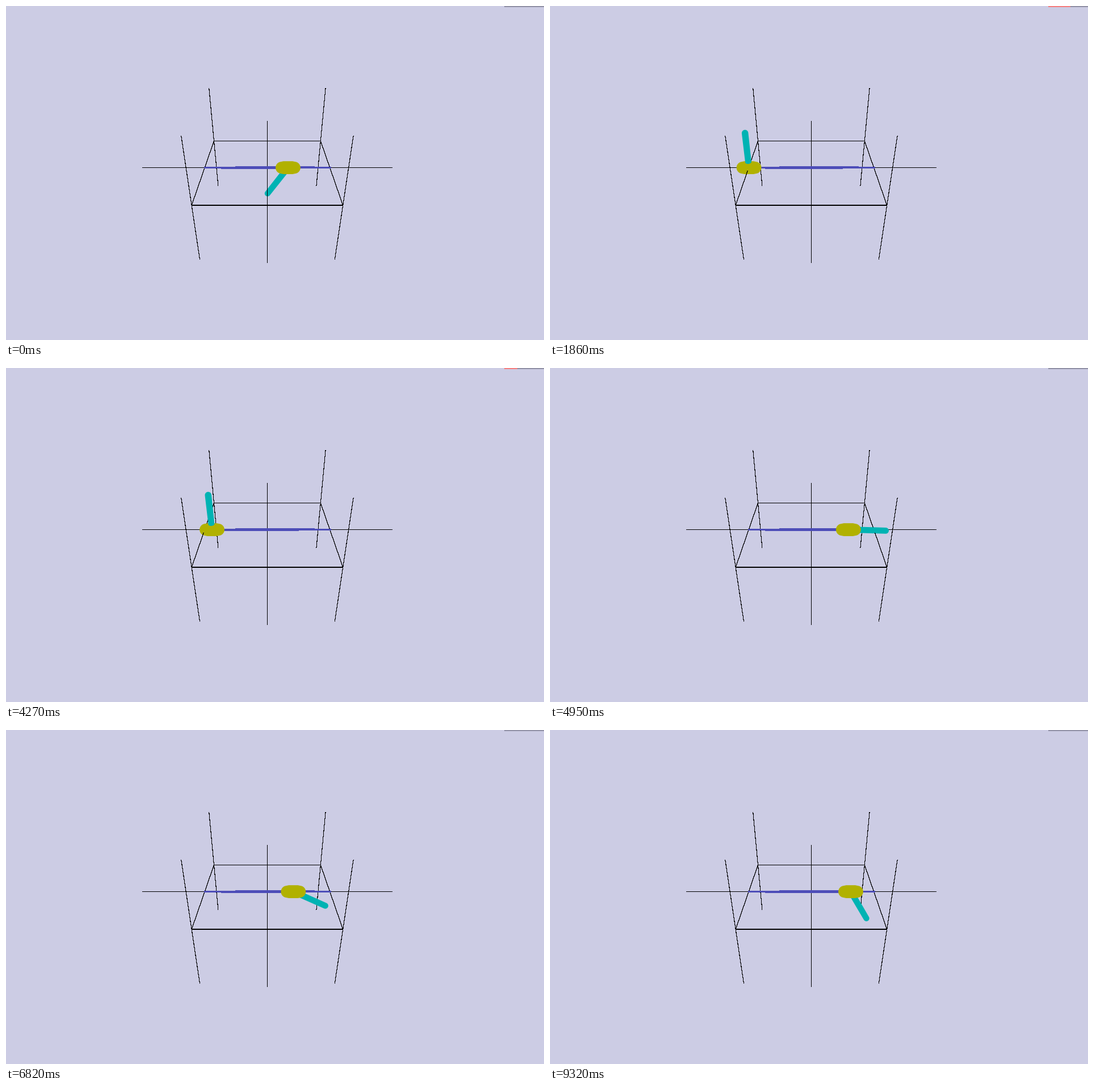
These frames come from a looping animation (948x590 px, 9370 ms). A matplotlib script:

```python
import numpy as np
import matplotlib.pyplot as plt
from matplotlib.animation import FuncAnimation
from matplotlib.patches import Polygon, Rectangle

W, H, DPI = 948, 590, 100
LOOP = 9370                      # ms
POSES = 206
FRAMES = 2 * POSES               # every pose is held for two frames
STEP = 9.32 / (POSES - 1)        # seconds between poses

CX, CY = 460.4, 285.4            # screen position of the world centre
FOCAL, DIST = 551, 5.0
SIN, COS = 0.5, np.sqrt(3) / 2   # camera pitch of 30 degrees

BACK = (0.8, 0.8, 0.894)
YELLOW = (0.694, 0.694, 0)
CYAN = (0, 0.7, 0.7)
BLUE = (0.3, 0.3, 0.72)
GREY = (0.57, 0.57, 0.65)
PINK = (0.96, 0.5, 0.5)

POLE, POLE_R = 0.6, 0.049

# Each swing: time the pole hangs straight down (s), right-most cart
# position, left resting position (px), slowness of the slide between them
SWINGS = [
    (0.050, 524, 350.5, 0.567),
    (2.420, 513, 363, 0.369),
    (4.765, 526, 359, 0.380),
    (6.690, 515, 391, 0.744),
    (9.262, 563, 391, 0.500),
]
CART_START = 465
FALL = 0.52                      # from upright to hanging
OVERRUN = 0.2                    # cart keeps going right after that
RISE_RATE = 4.5

# Strip in the corner: pulses run through it from right to left
STRIP_L, STRIP_SPEED = 878, 82
PULSE_FIRST, PULSE_EVERY, PULSE_LEN, PULSE_COUNT = 1.0, 2.225, 0.48, 4


def scale(y, z):
    return FOCAL / (DIST + y * COS - z * SIN)


def project(x, y, z):
    k = scale(y, z)
    return np.array([CX + x * k, CY - (y * SIN + z * COS) * k])


fig = plt.figure(figsize=(W / DPI, H / DPI), dpi=DPI, facecolor=BACK)
ax = fig.add_axes([0, 0, 1, 1])
ax.set_xlim(0, W)
ax.set_ylim(H, 0)
ax.axis("off")


def shape(points, color, z, **style):
    p = Polygon(points, closed=True, facecolor=color, edgecolor="none",
                zorder=z, **style)
    ax.add_patch(p)
    return p


def line(p, q, z):
    """Hard one-pixel line, drawn as a very thin ribbon."""
    a, b = project(*p), project(*q)
    d = (b - a) / np.hypot(*(b - a))
    n = 0.05 * np.array([-d[1], d[0]])
    shape([a + n, b + n, b - n, a - n], "black", z,
          antialiased=False, snap=False)


def box(x, y, w, h, color, z):
    r = Rectangle((x, y), w, h, facecolor=color, edgecolor="none", zorder=z)
    ax.add_patch(r)
    return r


# Wire frame; parts nearer than the cart go on top
BEHIND, FRONT, SPLIT = 1, 6, -0.1
line((-2, 0, 0), (2, 0, 0), BEHIND)
for x, reach in ((-1, 1), (0, 2), (1, 1)):
    line((x, reach, 0), (x, SPLIT, 0), BEHIND)
    line((x, SPLIT, 0), (x, -reach, 0), FRONT)
for y, z in ((1, BEHIND), (-1, FRONT)):
    line((-1, y, 0), (1, y, 0), z)
    for x in (-1, 1):
        line((x, y, -1), (x, y, 1), z)

# Rail, a little thicker in the middle
for left, right, top, bottom in ((349, 573, 284, 287), (404, 544, 283, 287),
                                 (379, 516, 284, 288)):
    box(left, top, right - left, bottom - top, BLUE, 2)

# Cart outline around its own centre
a = np.radians(np.linspace(-70, 70, 15))
side = np.column_stack([11.3 + 10.6 * np.cos(a), 10.6 * np.sin(a)])
half = np.vstack([[8, -11.4], side, [8, 11.4]])
CART_SHAPE = np.vstack([half, -half])
CART_Y = 285.6

cart = shape(CART_SHAPE, YELLOW, 4)
pole = shape(CART_SHAPE, CYAN, 5)

box(STRIP_L, 0, W - STRIP_L, 2, GREY, 7)
pulses = [box(STRIP_L, 0, 0, 2, PINK, 8) for _ in range(PULSE_COUNT)]


def state(t):
    """Cart centre in pixels and pole angle clockwise from upright."""
    x, angle = CART_START, 0
    for low, peak, rest, slow in SWINGS:
        since = t - low
        if since < 0:
            angle -= np.pi * max(0, 1 + since / FALL) ** 2
        else:
            angle += 4 * np.arctan(np.exp(-RISE_RATE * since))
        push = np.clip((since + FALL) / (FALL + OVERRUN), 0, 1) ** 1.5
        x += (peak - x) * push * push * (3 - 2 * push)
        slide = max(0, since - OVERRUN) / slow
        x += (rest - x) * (1 - np.exp(-slide ** 2))
    return x, angle


def pole_points(cx, angle):
    s, c = np.sin(angle), np.cos(angle)
    world_x = (cx - CX) / scale(0, 0)
    # where the pole leaves the capsule of the cart
    start = 0.1 / c if c > abs(s) else 0.2 * abs(s)
    if c <= 0:
        start = min(start, 0.05)
    base = project(world_x + start * s, 0, start * c)
    tip = project(world_x + POLE * s, 0, POLE * c)
    along = (tip - base) / np.hypot(*(tip - base))
    across = np.array([-along[1], along[0]])
    r0 = POLE_R * scale(0, start * c)
    r1 = POLE_R * scale(0, POLE * c)
    bulge = 3.2 * max(c, 0)
    u = np.linspace(-np.pi / 2, np.pi / 2, 13)[:, None]
    end = tip + r1 * (np.cos(u) * along + np.sin(u) * across)
    foot = base - bulge * np.cos(u) * along - r0 * np.sin(u) * across
    return np.vstack([end, foot])


def draw(i):
    t = min((i + 1) // 2, POSES - 1) * STEP
    cx, angle = state(t)
    cart.set_xy(CART_SHAPE + [cx, CART_Y])
    pole.set_xy(pole_points(cx, angle))
    pole.set_zorder(5 if np.cos(angle) > 0 else 3)
    for k, p in enumerate(pulses):
        age = t - PULSE_FIRST - k * PULSE_EVERY
        ends = W - STRIP_SPEED * np.array([age, age - PULSE_LEN])
        left, right = np.clip(ends, STRIP_L, W)
        p.set_x(left)
        p.set_width(right - left)
        p.set_visible(right - left > 0.5)
    return [cart, pole, *pulses]


anim = FuncAnimation(fig, draw, frames=FRAMES, interval=LOOP / FRAMES,
                     repeat=True, repeat_delay=0, blit=False)
plt.show()
```
